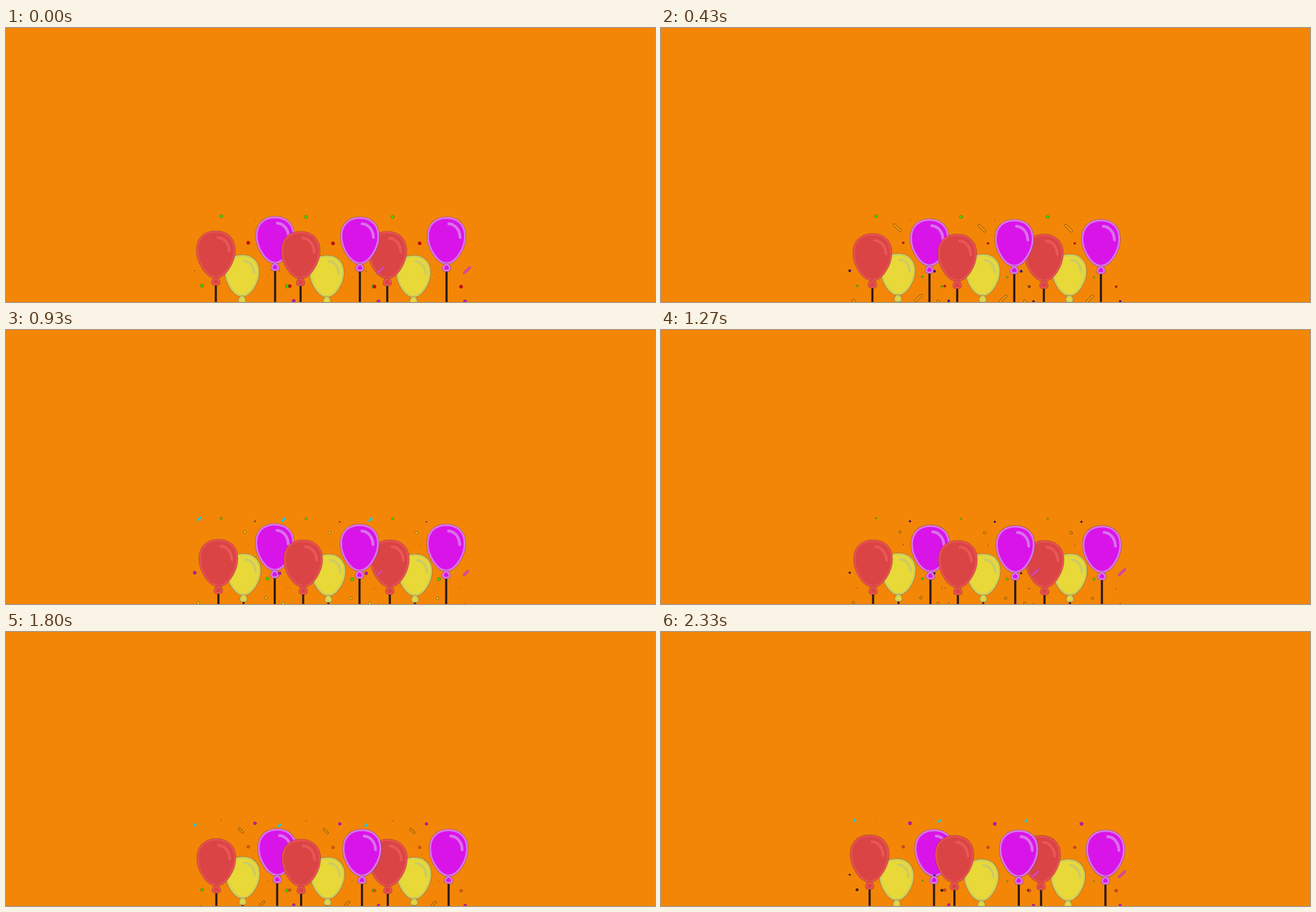
Write an HTML page with a canvas that moves like this. It is 1152x486 px and loops after 2360 ms.

```html
<!DOCTYPE html>
<html lang="en">
<head>
<meta charset="utf-8">
<title>Balloons</title>
<style>
  html, body { margin: 0; width: 100%; height: 100%; overflow: hidden; background: #f38607; }
  canvas { display: block; }
</style>
</head>
<body>
<canvas id="stage" width="1152" height="486"></canvas>
<script>
const W = 1152, H = 486, LOOP = 2360, STEP = 100 / 3;
const ctx = document.getElementById('stage').getContext('2d');

const COPIES = [[304.3, 1], [0, 0], [150.5, 1]];

const wave = (mid, amp, peak, rate) => t => mid + amp * Math.cos((t - peak) * rate);
const ramp = (v, a, b) => Math.min(1, Math.max(0, (v - a) / (b - a)));
const hump = (v, a, b, c, d) => ramp(v, a, b) * ramp(v, d, c);

const YELLOW = { fill: '#e8d838', rim: '#c9cc62', shine: '#cdcb66' };
const PURPLE = { fill: '#d914e9', rim: '#d973e8', shine: '#da70ea' };
const RED = { fill: '#da4444', rim: '#e75050', shine: '#e95656' };
const FLASH = { fill: '#cf0000', rim: '#dcc850', shine: '#dcc850' };

const BALLOONS = [
  { look: () => YELLOW, size: 0.885,
    x: wave(419.5, 2.2, 1050, 0.0017), y: wave(399, -3.3, 1220, 0.0024) },
  { look: () => PURPLE, size: 1,
    x: wave(481.8, -5.3, 560, 0.0012), y: wave(334, 15.9, 2380, 0.00066) },
  { look: t => t > 660 && t < 760 ? FLASH : RED, size: 1,
    x: wave(373.4, 3.6, 970, 0.0019), y: wave(365.8, 6.5, 1180, 0.00238) }
];

const green = () => '#45d40e';
const mossy = t => t > 1900 ? '#3c2614' : '#3fd00e';
const ruby = t => t > 2150 ? '#dc4038' : t > 1800 ? '#e05a10' : '#d60810';
const violet = (t, r) => r < 2.45 ? '#2c0e98' : '#b41cc4';

// Confetti dots swell and shrink, either once or half as often per loop.
const QUICK = 2 * Math.PI / 2040, SLOW = QUICK / 2.15;
const dot = (x, y, color, peak, rate) => ({ x, y, color, r: wave(1.6, 1.4, peak, rate) });
const DOTS = [
  dot(382, 334, green, 100, SLOW),
  dot(348, 457.3, mossy, 2030, QUICK),
  dot(464, 441, green, 900, QUICK),
  dot(430, 381, ruby, 2050, QUICK),
  dot(503.6, 457.8, ruby, 2070, QUICK),
  dot(510.7, 484, violet, 2060, QUICK),
  dot(442, 339.3, violet, 2300, SLOW),
  dot(335, 430.5, violet, 800, QUICK)
];

// Each trim gives the visible part of a stick: [start, end].
const candyTrim = t => [
  0.92 * hump(t, 430, 850, 1300, 1600),
  hump(t, 100, 400, 1640, 2030)
];
const cyanTrim = t => {
  const u = t % 1300;
  return [ramp(u, 665, 1110), ramp(u, 450, 665)];
};
const pinkTrim = t => {
  const u = (t + 550) % 1300;
  return [ramp(u, 560, 800), ramp(u, 0, 280)];
};

const candyColor = t => t < 600 ? '#f79a10' : t < 1000 ? '#eed038' : '#e88c08';
const candy = (from, to) => ({ from, to, trim: candyTrim, color: candyColor, edge: '#6b430c' });
const STICKS = [
  candy([414, 349], [424.3, 359]),
  candy([452, 484], [461.8, 474.5]),
  candy([351, 493], [341, 483.5]),
  { from: [334, 343], to: [344.7, 333.2], trim: cyanTrim, color: () => '#14cce4' },
  { from: [509, 433.2], to: [519, 424], trim: pinkTrim, color: () => '#e044b0', edge: '#a8506c' }
];

const body = new Path2D(
  'M0 1.8C21 1.8 32.8 15 32.8 34.5C32.8 55 17 82.2 0 82.2C-17 82.2 -32.8 55 -32.8 34.5C-32.8 15 -21 1.8 0 1.8Z');
const knot = new Path2D(
  'M0 84C4 84.5 5.8 89 5.8 92C6 96.4 -6 96.4 -5.8 92C-5.8 89 -4 84.5 0 84Z');
const shine = new Path2D('M4 12.2C14.5 12.5 23.5 22.5 24 36.5');

function stroke(path, color, width) {
  ctx.strokeStyle = color;
  ctx.lineWidth = width;
  ctx.stroke(path);
}

function drawBalloon(b, t) {
  const c = b.look(t);
  ctx.save();
  ctx.translate(b.x(t), b.y(t));
  ctx.scale(b.size, b.size);
  ctx.fillStyle = '#2e1a1c';
  ctx.fillRect(-1.9, 95, 3.8, 100);
  for (const part of [body, knot]) {
    stroke(part, 'rgba(70, 30, 40, 0.5)', 4.6);
    ctx.fillStyle = c.fill;
    ctx.fill(part);
    stroke(part, c.rim, 3.4);
  }
  stroke(shine, c.shine, 5);
  ctx.restore();
}

function drawDot(d, t) {
  const r = d.r(t);
  ctx.beginPath();
  ctx.arc(d.x, d.y, r, 0, Math.PI * 2);
  ctx.fillStyle = d.color(t, r);
  ctx.fill();
  ctx.strokeStyle = 'rgba(50, 25, 10, 0.45)';
  ctx.lineWidth = 0.7;
  ctx.stroke();
}

function drawStick(s, t) {
  const [a, b] = s.trim(t);
  if (b - a < 0.02) return;
  const at = (u, k) => s.from[k] + (s.to[k] - s.from[k]) * u;
  const line = new Path2D();
  line.moveTo(at(a, 0), at(a, 1));
  line.lineTo(at(b, 0), at(b, 1));
  if (s.edge) stroke(line, s.edge, 4.6);
  stroke(line, s.color(t), s.edge ? 3.2 : 3.8);
}

function draw(t) {
  ctx.fillStyle = '#f38607';
  ctx.fillRect(0, 0, W, H);
  ctx.lineCap = ctx.lineJoin = 'round';
  for (const [dx, dy] of COPIES) {
    ctx.save();
    ctx.translate(dx, dy);
    BALLOONS.forEach(b => drawBalloon(b, t));
    DOTS.forEach(d => drawDot(d, t));
    STICKS.forEach(s => drawStick(s, t));
    ctx.restore();
  }
}

const start = performance.now();

// Motion advances at 30 steps per second, with a longer hold on the first pose.
function tick() {
  const t = (performance.now() - start) % LOOP;
  draw(t < 70 ? 0 : Math.floor((t + 5) / STEP) * STEP);
  requestAnimationFrame(tick);
}
tick();
</script>
</body>
</html>
```
